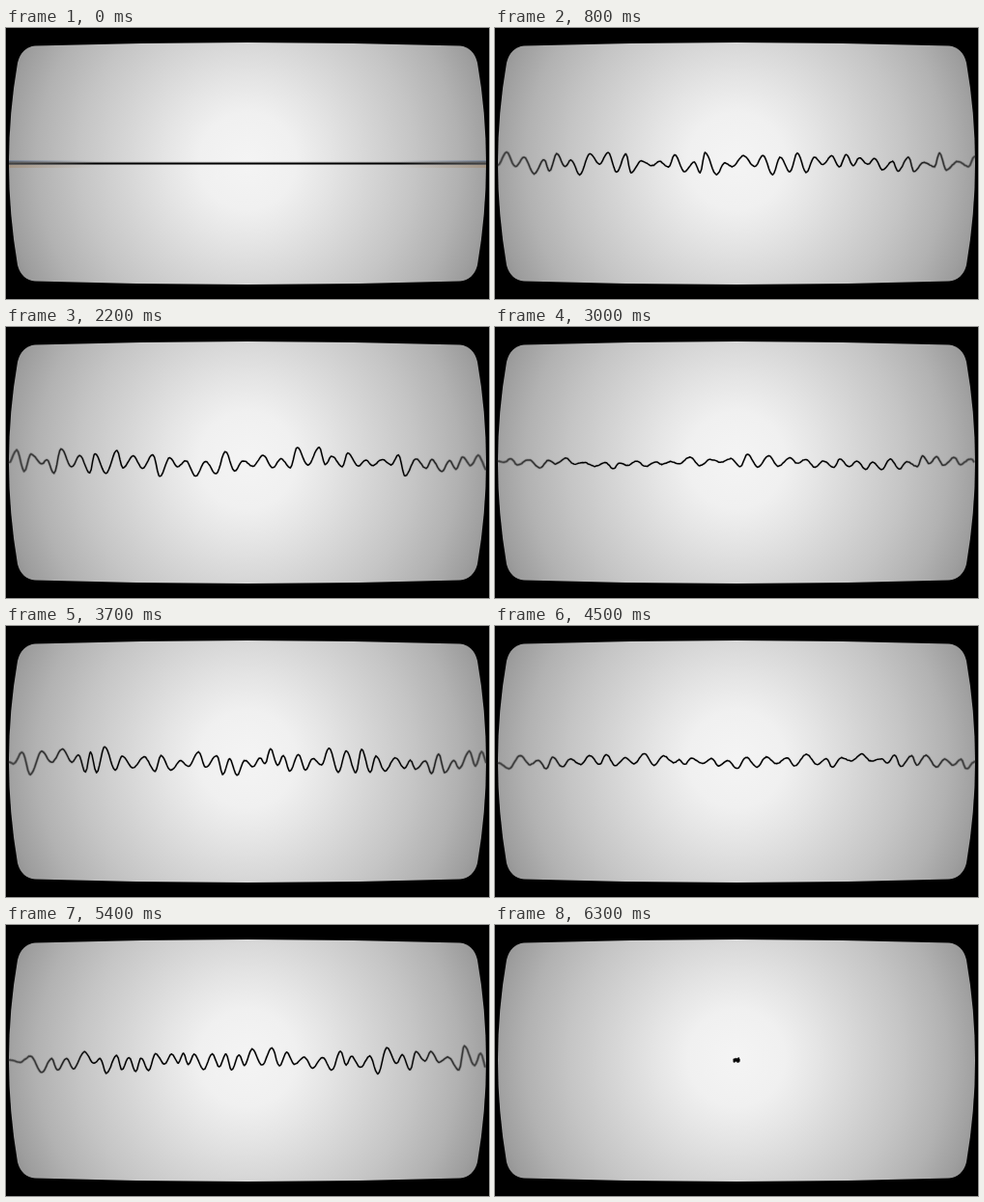
An HTML page with a canvas for the animation above (6400 ms loop, 500 by 281 pixels).

```html
<!DOCTYPE html>
<html lang="en">
<head>
<meta charset="utf-8">
<title>Waveform</title>
<style>
  html, body { margin: 0; width: 100%; height: 100%; overflow: hidden; background: #000; }
  canvas { display: block; width: 100%; height: 100%; }
</style>
</head>
<body>
<canvas id="stage" width="500" height="281"></canvas>
<script>
const W = 500, H = 281, MID = 140, CX = 250;
const LEFT = 3, RIGHT = 497;
const LOOP = 6400, STEP = 100, START = 600, SQUEEZE = 6000;
const ctx = document.getElementById('stage').getContext('2d');

function random(seed) {
  return () => {
    seed = (seed + 0x6D2B79F5) | 0;
    let n = Math.imul(seed ^ (seed >>> 15), 1 | seed);
    n = (n + Math.imul(n ^ (n >>> 7), 61 | n)) ^ n;
    return ((n ^ (n >>> 14)) >>> 0) / 4294967296;
  };
}

// A new zigzag for every step: uneven spacing and swing, slow drift, slight roughness.
function makeWave(time) {
  const rnd = random(time);
  const swing = 12 - 4 * Math.cos((time - 1400) / 1600 * 2 * Math.PI);
  const phase = rnd() * 6.28;
  const points = [];
  let x0 = LEFT, y0 = 0, side = rnd() < 0.5 ? 1 : -1;
  while (x0 < RIGHT) {
    const x1 = x0 + 5 + rnd() * 7;
    const y1 = side * swing * (0.1 + 0.8 * rnd() ** 1.3);
    for (let x = x0; x < Math.min(x1, RIGHT); x += 1.5) {
      const ease = (1 - Math.cos((x - x0) / (x1 - x0) * Math.PI)) / 2;
      const drift = 1.5 * Math.sin(x / 40 + phase);
      points.push([x, MID + 0.5 + y0 + (y1 - y0) * ease + drift + (rnd() - 0.5) * 0.7]);
    }
    x0 = x1;
    y0 = y1;
    side = -side;
  }
  return points;
}

function makeScreen() {
  const layer = document.createElement('canvas');
  layer.width = W;
  layer.height = H;
  const c = layer.getContext('2d');
  c.fillStyle = '#000';
  c.fillRect(0, 0, W, H);

  const g = c.createRadialGradient(CX, 138, 0, CX, 138, 280);
  [[0, 244], [0.18, 240], [0.3, 229], [0.45, 214], [0.62, 197], [0.78, 178], [0.9, 158], [1, 136]]
    .forEach(([at, v]) => g.addColorStop(at, `rgb(${v},${v},${v})`));

  c.beginPath();
  c.moveTo(30, 18.5);
  c.quadraticCurveTo(CX, 11.5, 470, 18.5);
  c.quadraticCurveTo(484, 20, 488, 36);
  c.quadraticCurveTo(506, MID, 488, 246);
  c.quadraticCurveTo(484, 261, 470, 262.5);
  c.quadraticCurveTo(CX, 269.5, 30, 262.5);
  c.quadraticCurveTo(16, 261, 12, 246);
  c.quadraticCurveTo(-6, MID, 12, 36);
  c.quadraticCurveTo(16, 20, 30, 18.5);
  c.closePath();
  c.filter = 'blur(0.5px)';
  c.fillStyle = g;
  c.fill();
  return layer;
}

// Horizontal gradient between the end and the middle opacity.
function fade(rgb, ends, middle) {
  const g = ctx.createLinearGradient(LEFT, 0, RIGHT, 0);
  [[0, ends], [0.18, middle], [0.82, middle], [1, ends]]
    .forEach(([at, a]) => g.addColorStop(at, `rgba(${rgb},${a})`));
  return g;
}

const screen = makeScreen();
const ink = fade('0,0,0', 0.45, 1);
const haze = fade('40,40,40', 0.35, 0.08);
const blue = fade('40,75,130', 0.28, 0);
const amber = fade('165,110,50', 0.28, 0);

function bar(style, y, h) {
  ctx.fillStyle = style;
  ctx.fillRect(LEFT, y, RIGHT - LEFT, h);
}

function drawFlat() {
  bar(blue, 137, 2);
  bar(amber, 142, 3);
  bar(haze, 138, 4);
  bar(ink, 139.5, 2);
}

function drawWave(points, scale) {
  // The trace loses height and weight as it closes to a point.
  const thin = Math.min(1, 0.3 + scale * 3);
  ctx.beginPath();
  for (const [x, y] of points) {
    ctx.lineTo(CX + (x - CX) * scale, MID + (y - MID) * thin);
  }
  ctx.lineJoin = ctx.lineCap = 'round';
  ctx.strokeStyle = haze;
  ctx.lineWidth = 3 * thin;
  ctx.stroke();
  ctx.strokeStyle = ink;
  ctx.lineWidth = 1.5 * thin;
  ctx.stroke();
}

function draw(now) {
  const time = Math.floor((now % LOOP) / STEP) * STEP;
  ctx.drawImage(screen, 0, 0);
  if (time < START) {
    drawFlat();
  } else {
    const scale = time < SQUEEZE ? 1 : 0.8 * 0.25 ** ((time - SQUEEZE) / STEP);
    drawWave(makeWave(time), scale);
  }
}

const begin = performance.now();
function tick() {
  draw(performance.now() - begin);
  requestAnimationFrame(tick);
}
tick();
</script>
</body>
</html>
```
